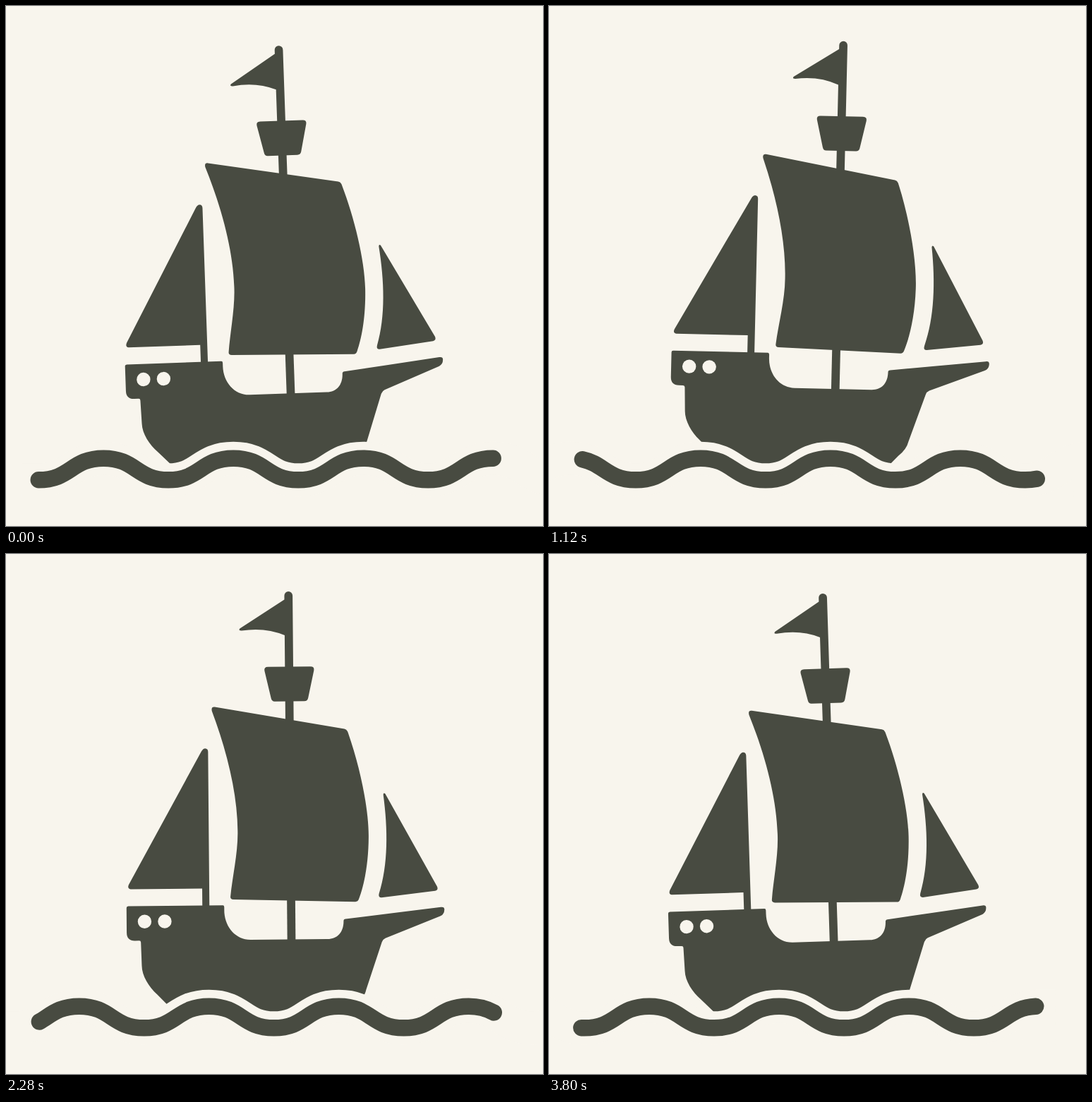
Write an HTML page that moves like this. It is 761x736 px and loops after 3.84 s.

```html
<!DOCTYPE html>
<html lang="en">
<head>
<meta charset="utf-8">
<title>Ship at sea</title>
<style>
  html, body { margin: 0; height: 100%; overflow: hidden; background: #f8f5ed; }
  svg { display: block; width: 761px; height: 736px; }
  #ship { fill: #484b41; }
  #ship circle { fill: #f8f5ed; }
  #cover { fill: #f8f5ed; stroke: #f8f5ed; stroke-width: 47; }
  #wave { fill: none; stroke: #484b41; stroke-width: 23.4; stroke-linecap: round; stroke-dasharray: 7 20; }
</style>
</head>
<body>
<svg viewBox="0 0 761 736">
  <g id="ship">
    <!-- mast, flag and crow's nest -->
    <path d="M399 240V114Q371 102 338 107Q333 107 335.5 104L399 63.500V58A5.800 5.800 0 0 1 410.700 58V240Z"/>
    <path d="M375 158.500H435Q441 158.500 440 164L431.500 203Q430.500 207.500 426 207.500H384Q380 207.500 379 203L370 164Q369 158.500 375 158.500Z"/>
    <path d="M399 485H410.700V546H399Z"/>
    <!-- main sail -->
    <path d="M299 214.700L482.500 247.200Q485.500 247.700 487 251C503 297 516 358 515.500 400C515 440 508 470 500.800 488.500Q499.500 492 496 492L323 487.300Q318.500 487 319 483C322 455 330.500 420 330 390C330 338 316 278 295 220.500Q293.500 214 299 214.700Z"/>
    <!-- mizzen sail -->
    <path d="M279.500 277.500Q282 273.200 285 273.200Q289 273.500 289 278V498H279V471.500H177.500Q172.500 470.500 175 465Z"/>
    <!-- fore sail -->
    <path d="M536.800 341Q537 337.500 539.500 339.500L612 471.500Q614 476.500 609 477.500L533 486.500Q528 486.500 529.500 481C543 440 543 390 536.800 341Z"/>
    <!-- hull -->
    <path d="M174 495.500H308Q310 495.500 310 498V503C310 525 325 544.500 347 544.500H456C470 544.500 479 535 479 519Q479 516.500 482 516.200L617 500.700Q622 500 622 504Q622 511 616 513.500L538 544Q534.500 545.500 533 549.500L510 617Q508 627 496 637.500L470 665H257L214 621C202 610 192.500 594 192.500 580L191.500 547Q191.500 544.500 189 544.500H183Q171.500 544.500 171.500 533V498Q171.500 495.500 174 495.500Z"/>
    <circle cx="197" cy="517.500" r="9.700"/>
    <circle cx="225.500" cy="517.500" r="9.700"/>
  </g>
  <g id="sea">
    <path id="cover"/>
    <path id="wave" pathLength="9"/>
  </g>
</svg>
<script>
  const PERIOD = 1920, STEP = 40;
  const HALF_WAVE = 92, LEFT = 46.2, CREST = 640.2, TROUGH = 670.8;
  const [ship, sea, cover, wave] = ['ship', 'sea', 'cover', 'wave'].map(id => document.getElementById(id));

  let curve = `M${LEFT} ${TROUGH}`;
  for (let i = 0; i < 9; i++) {
    const x = LEFT + i * HALF_WAVE, mid = x + HALF_WAVE / 2;
    const [from, to] = i % 2 ? [CREST, TROUGH] : [TROUGH, CREST];
    curve += `C${mid} ${from} ${mid} ${to} ${x + HALF_WAVE} ${to}`;
  }
  wave.setAttribute('d', curve);
  cover.setAttribute('d', `${curve}V760H${LEFT}Z`);

  function draw() {
    const time = Math.floor(performance.now() / STEP) * STEP;
    const phase = time % PERIOD / PERIOD;
    const tilt = 2 - 8 * Math.abs(phase - 0.5);
    ship.setAttribute('transform', `rotate(${tilt} 513 584)`);
    // The sea slides one wavelength while the visible stretch stays in place
    sea.setAttribute('transform', `translate(${-2 * HALF_WAVE * phase})`);
    wave.style.strokeDashoffset = -2 * phase;
    requestAnimationFrame(draw);
  }
  draw();
</script>
</body>
</html>
```
